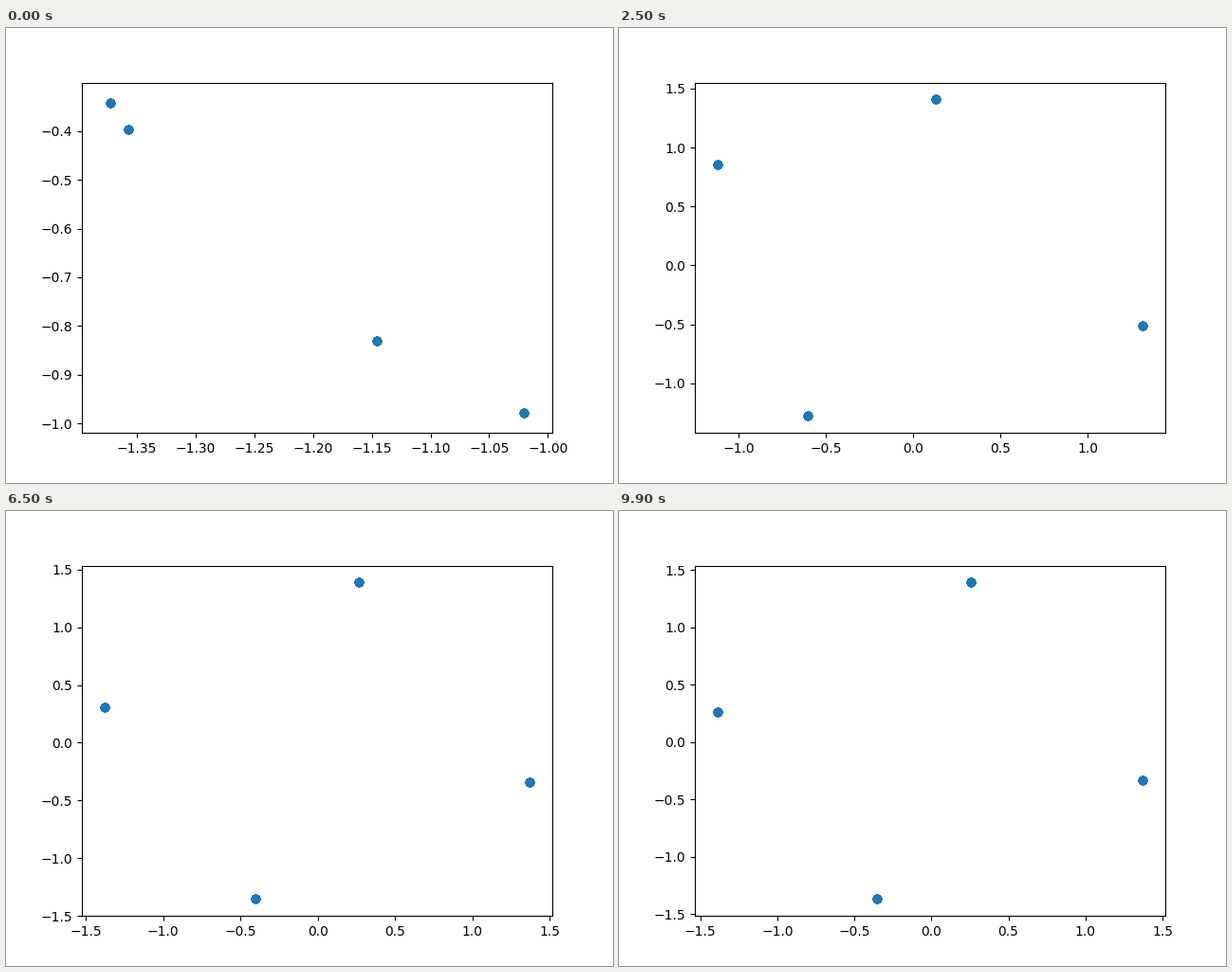
A matplotlib script that plays this animation: 640x480 px, repeating every 10000 ms.

```python
import numpy as np
import matplotlib.pyplot as plt
from matplotlib.animation import FuncAnimation

FRAMES, INTERVAL = 100, 100
RADIUS = np.sqrt(2)
COPIES = 12                        # stacked dots give the hard edges
PAD = 3 / np.array([496, 369.6])   # marker radius in axes units
MARGIN = 0.05

# Four points spreading out on a circle: angles in degrees at key steps
STEPS = np.array([0, 12, 25, 39, 65, 86, 99])
ANGLES = np.array([
    [193.96, 91.48, 84.66, 80.68, 79.17, 82.43, 79.66],
    [196.30, 107.17, 142.54, 161.44, 167.50, 169.66, 169.43],
    [215.92, 241.60, 244.76, 247.90, 253.43, 254.11, 255.42],
    [223.81, 313.95, 338.67, 342.82, 345.98, 346.37, 346.28],
])


def key_slopes(x, y):
    """Slopes of a monotone cubic through the keys."""
    d = np.diff(y) / np.diff(x)
    m = np.empty(len(y))
    m[0], m[-1] = d[0], d[-1]
    for i in range(1, len(y) - 1):
        a, b = d[i - 1], d[i]
        m[i] = 2 * a * b / (a + b) if a * b > 0 else 0
    return m


SLOPES = np.array([key_slopes(STEPS, row) for row in ANGLES])


def angles_at(step):
    i = min(np.searchsorted(STEPS, step, side="right") - 1, len(STEPS) - 2)
    h = STEPS[i + 1] - STEPS[i]
    u = (step - STEPS[i]) / h
    return ((1 + 2 * u) * (1 - u) ** 2 * ANGLES[:, i]
            + u * (1 - u) ** 2 * h * SLOPES[:, i]
            + u ** 2 * (3 - 2 * u) * ANGLES[:, i + 1]
            + u ** 2 * (u - 1) * h * SLOPES[:, i + 1])


def points_at(step):
    a = np.radians(angles_at(step))
    return RADIUS * np.column_stack([np.cos(a), np.sin(a)])


fig, ax = plt.subplots(figsize=(6.4, 4.8), dpi=100)
start = np.tile(points_at(0), (COPIES, 1))
dots = ax.scatter(start[:, 0], start[:, 1], color="C0")


def update(step):
    pts = points_at(step)
    dots.set_offsets(np.tile(pts, (COPIES, 1)))
    low, high = pts.min(axis=0) - PAD, pts.max(axis=0) + PAD
    gap = MARGIN * (high - low)
    low, high = low - gap, high + gap
    ax.set_xlim(low[0], high[0])
    ax.set_ylim(low[1], high[1])
    return dots,


anim = FuncAnimation(fig, update, frames=FRAMES, interval=INTERVAL,
                     init_func=lambda: update(0), repeat=True,
                     repeat_delay=0, blit=False)
plt.show()
```
